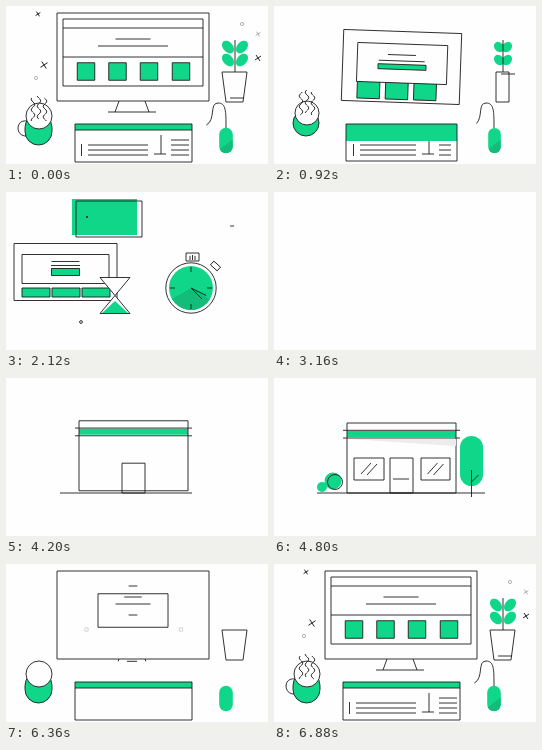
Animation of 262x158 px, one loop 6.92 s. Source, as an HTML page with a canvas:

```html
<!DOCTYPE html>
<html lang="en">
<head>
<meta charset="utf-8">
<style>
html, body { margin: 0; height: 100%; overflow: hidden; background: #fefefe; }
canvas { display: block; width: 100vw; height: 100vh; }
</style>
</head>
<body>
<canvas></canvas>
<script>
const LOOP = 6920, CUT = 3160;
const GREEN = '#10d68a', SHADE = '#13bd79', INK = '#1c1c1c', PAPER = '#fefefe', GREY = '#aaa';
const canvas = document.querySelector('canvas');
const c = canvas.getContext('2d');

const clamp = v => Math.max(0, Math.min(1, v));
const ease = v => v < .5 ? 4 * v ** 3 : 1 - (2 - 2 * v) ** 3 / 2;

// Keys are [time, ...values]; the values are held before the first and after the last.
function track(t, ...keys) {
  const next = keys.findIndex(k => k[0] > t);
  if (next === 0) return keys[0].slice(1);
  if (next < 0) return keys.at(-1).slice(1);
  const a = keys[next - 1], b = keys[next];
  const k = ease((t - a[0]) / (b[0] - a[0]));
  return a.slice(1).map((v, i) => v + (b[i + 1] - v) * k);
}
// Rises from 0 to 1 after `from` and falls back to 0 before `to`.
const show = (t, from, to, d = 160) => ease(clamp((t - from) / d)) * ease(clamp((to - t) / d));

function paint(fill, stroke = INK) {
  if (fill) { c.fillStyle = fill; c.fill(); }
  if (stroke) { c.strokeStyle = stroke; c.stroke(); }
}
function poly(points, fill, stroke, closed = true) {
  c.beginPath();
  points.forEach(p => c.lineTo(...p));
  if (closed) c.closePath();
  paint(fill, stroke);
}
const line = (x1, y1, x2, y2, color) => poly([[x1, y1], [x2, y2]], null, color, false);
function rect(x, y, w, h, fill, stroke) {
  c.beginPath();
  c.rect(x, y, w, h);
  paint(fill, stroke);
}
const centred = (x, y, w, h, fill, stroke) => rect(x - w / 2, y - h / 2, w, h, fill, stroke);
function pill(x, y, rx, ry, fill, stroke) {
  if (rx <= 0 || ry <= 0) return;
  c.beginPath();
  c.roundRect(x - rx, y - ry, 2 * rx, 2 * ry, Math.min(rx, ry));
  paint(fill, stroke);
}
const circle = (x, y, r, fill, stroke) => pill(x, y, r, r, fill, stroke);
function at(x, y, degrees, scale, draw) {
  if (scale <= 0) return;
  c.save();
  c.translate(x, y);
  c.rotate(degrees * Math.PI / 180);
  c.scale(scale, scale);
  draw();
  c.restore();
}

function particles(t) {
  const s = show(t, -440, 700);
  const cross = (x, y, r, color) => at(x, y, 12 + Math.max(0, t) * .05, s, () => {
    line(-r, -r, r, r, color);
    line(-r, r, r, -r, color);
  });
  cross(32, 8, 2);
  cross(38, 59, 3);
  cross(252, 28, 2, GREY);
  cross(252, 52, 2.5);
  [[30, 72], [236, 18]].forEach(([x, y]) => at(x, y, 0, s, () => circle(0, 0, 1.6, null, GREY)));
  if (t > 1350) {
    const [x] = track(t, [1350, 205], [1480, 211], [2400, 228]);
    line(x - 2, 34, x + 2, 34);
    at(144, 51, 0, show(t, 1350, 1650), () => circle(0, 0, .7, INK, null));
  }
}

function screen(t) {
  const [x, y, w, h, turn] = track(t,
    [-3120, 127.5, -40, 109, 70, 0], [-2640, 127.5, 80, 109, 70, 0], [-1160, 127.5, 80, 109, 70, 0],
    [-1000, 127.5, 25, 64, 75, 2], [-620, 127, 51, 152, 88, 0], [420, 127, 51, 152, 88, 0],
    [920, 127.5, 61, 118, 71, 2], [1480, 68.5, 80, 103, 57, -1], [2000, 59.5, 80, 103, 57, 0]);
  at(x, y, turn, 1, () => {
    centred(0, 0, w, h);
    const s = show(t, -680, 9999, 240);
    if (!s) return;
    const [ix, iy, iw, ih] = track(t, [420, 0, -4.5, 140, 67], [920, .5, -3.5, 90, 39], [1480, 0, -3, 87, 29]);
    const [gap, by, bw, bh, shift] = track(t,
      [420, 31.5, 14.5, 17.5, 17.5, -15.5], [920, 28.3, 24, 22.5, 17, -4], [1480, 30, 20.5, 28, 9, .5]);
    const [bx, buttonY, buttonW, buttonH] = track(t,
      [420, 48, 14.5, 17.5, 17.5], [920, .5, 0, 48, 5], [1480, 0, 0, 28, 7]);
    const pop = show(t, -560, 9999, 240);
    const tiles = () => {
      for (let i = -1; i < 2; i++) centred(shift + i * gap, by, bw * pop, bh * pop, GREEN);
    };
    const panel = fill => centred(ix, iy, iw * s, ih * s, fill);
    if (t < 560) { panel(); tiles(); } else { tiles(); panel(PAPER); }
    centred(bx, buttonY, buttonW * pop, buttonH * pop, GREEN);

    const rule = 70 * show(t, -600, 560);
    if (rule) { line(-rule, -29, rule, -29); line(-rule, 0, rule, 0); }
    const [y1, w1, y2, w2] = track(t,
      [420, -18, 17.5, -11, 35], [920, -12, 14, -6, 23], [1480, -10.5, 14, -6.5, 14.5]);
    line(-w1 * s, y1, w1 * s, y1);
    line(-w2 * s, y2, w2 * s, y2);
  });
  const stand = show(t, -620, 560);
  if (stand) {
    const foot = 95 + 11 * stand;
    line(113, 95, 113 - 4 * stand, foot);
    line(139, 95, 139 + 4 * stand, foot);
    line(126 - 24 * stand, foot, 126 + 24 * stand, foot);
  }
}

function keyboard(t) {
  const band = track(t,
    [-3120, 73, -67, 109, 6], [-2640, 73, 53, 109, 6], [-1160, 73, 53, 109, 6], [-1000, 72, 53.5, 111, 6],
    [-600, 69, 118, 117, 6], [700, 69, 118, 117, 6], [920, 72, 118, 111, 17], [1440, 66, 7, 65, 36]);
  rect(...band, GREEN, null);
  if (t < -960) {
    line(69, band[1] - .7, 186, band[1] - .7);
    line(69, band[1] + 7, 186, band[1] + 7);
    return;
  }
  const frame = track(t,
    [-960, 69, 53, 117, 7], [-600, 69, 118, 117, 38], [700, 69, 118, 117, 38],
    [920, 72, 118, 111, 37], [1480, 76, 10, 66, 36], [2100, 70, 9, 66, 36]);
  rect(...frame);
  if (t < 720) line(69, band[1] + band[3], 186, band[1] + band[3]);
  const s = show(t, -560, 1080);
  if (s) {
    const [left, right] = track(t, [700, 82, 183], [920, 86, 177]);
    line(left - 6.5, 138, left - 6.5, 138 + 12 * s);
    [139, 144, 149].forEach(y => {
      line(left, y, left + (142 - left) * s, y);
      line(165, y, 165 + (right - 165) * s, y);
    });
    if (t < 760) line(165, 134, 165 + 18 * s, 134);
    const top = track(t, [700, 129], [920, 135])[0];
    line(155, 148, 155, 148 - (148 - top) * s);
    line(148, 148, 148 + 12 * s, 148);
  }
  at(81, 25, 0, show(t, 1380, 2440), () => circle(0, 0, 1, INK, null));
}

function shopFront(t) {
  if (t > -460) return;
  const drop = show(t, -2640, -1160);
  if (drop) poly([[73, 61], [182, 61], [182, 61 + 7 * drop]], '#ececec', null);

  const [g1, g2] = track(t, [-3120, 120, 120], [-2720, 54, 186], [-2400, 54, 186], [-2140, 43, 211],
    [-960, 43, 211], [-740, 127, 127]);
  if (g1 < g2) line(g1, 115, g2, 115);

  const knob = 16 * show(t, -2500, -1080);
  if (knob) line(119, 101, 119 + knob, 101);

  const pane = (pose, glare) => {
    const [x, y, w, h, turn] = pose;
    at(x, y, turn, show(t, -2420, -480, 220), () => {
      centred(0, 0, w, h);
      if (glare) {
        line(-8, 5, 2, -6);
        line(-2, 6, 8, -5);
      }
    });
  };
  pane(track(t, [-1160, 95, 91, 30, 22, 0], [-1000, 71.5, 84, 35, 22, 39], [-560, 80.5, 65.5, 17, 17, 90]), t < -1100);
  pane(track(t, [-1160, 161.5, 91, 29, 22, 0], [-1000, 161.5, 87.5, 29, 21, 0], [-560, 175, 65.5, 17, 17, 0]), t < -900);
}

function plant(t) {
  const [x, y, top, bottom, h] = track(t,
    [-2880, 127.5, 115, 23, 23, 0], [-2640, 127.5, 97.5, 23, 23, 35], [-1160, 127.5, 97.5, 23, 23, 35],
    [-1000, 127.5, 93, 23, 23, 44], [-560, 228.5, 81, 25, 17, 30], [500, 228.5, 81, 25, 17, 30],
    [880, 228.5, 81, 13, 13, 30], [960, 228.5, 81, 13, 13, 30], [1440, 186.5, 65, 13, 13, 8]);
  if (t > -2880) {
    poly([[x - top / 2, y - h / 2], [x + top / 2, y - h / 2], [x + bottom / 2, y + h / 2], [x - bottom / 2, y + h / 2]]);
  }
  if (t > 1400) [-2.5, 0, 2.5].forEach(d => line(x + d, y - 2 + Math.abs(d) / 3, x + d, y + 3));

  const s = show(t, -520, 1160, 240);
  if (!s) return;
  const [spread, rx, ry] = track(t, [480, 7, 7.2, 5], [880, 4, 5.6, 4.6]);
  [41, 54].forEach(ly => [-1, 1].forEach(side => at(229 + side * spread, ly, side * -40 + (side < 0 ? 0 : 0), s, () => {
    c.beginPath();
    c.ellipse(0, 0, rx, ry, side < 0 ? .15 : -.15, 0, 7);
    paint(GREEN, null);
  })));
  line(229, 66, 229, 66 - 32 * s);
  const [lx, ly] = track(t, [500, 224, 92], [880, 227, 68]);
  line(lx, ly, lx + 14 * s, ly);
}

function mug(t) {
  const grow = show(t, -2400, 9999, 240);
  const bush = track(t, [-2140, 48, 109, 5], [-1160, 48, 109, 5], [-1000, 47, 109, 6], [-720, 34, 122, 0]);
  const body = track(t,
    [-1160, 59, 103, 8.5, 8.5], [-1000, 51, 116, 8, 8], [-560, 32.5, 123.5, 13.5, 15.5],
    [420, 32.5, 123.5, 13.5, 15.5], [820, 32, 117, 13, 13], [940, 32, 117, 13, 13], [1400, 75, 128, 0, 0]);
  const rim = track(t,
    [-1160, 61, 104, 7.5], [-1000, 38, 122, 8.5], [-560, 33, 110, 13], [420, 33, 110, 13],
    [820, 33, 107, 12], [940, 33, 107, 12], [1440, 75, 128, 1.4], [2160, 75, 130, 1.4], [2440, 75, 135, 0]);
  circle(bush[0], bush[1], bush[2] * grow, GREEN, null);

  const handle = show(t, -540, 640);
  at(19, 122, 0, handle, () => {
    c.beginPath();
    c.moveTo(2, -7);
    c.bezierCurveTo(-10, -9, -10, 9, 2, 8);
    paint();
  });
  pill(body[0], body[1], body[2] * grow, body[3] * grow, GREEN, t > -700 && t < 1300 ? INK : null);
  circle(rim[0], rim[1], rim[2] * grow, t > -1060 && t < 1400 ? PAPER : null);

  const steam = show(t, -480, 1100);
  if (steam) for (let i = -1; i < 2; i++) {
    c.beginPath();
    const low = t > 700 ? 109 : 115;
    for (let y = low; y > low - 24 * steam; y--) {
      c.lineTo(33 + i * 6 + 1.8 * Math.sin((y + t * .015) * .6 + i), y - (i ? 0 : 2));
    }
    paint();
  }
}

function mouse(t) {
  const grow = show(t, -2400, 9999, 240);
  const [x, y, rx, ry] = track(t,
    [-1160, 197.5, 83, 11.5, 25], [-1000, 197.5, 81, 12, 23.5], [-560, 220, 134.5, 6.8, 12.7],
    [700, 220, 134.5, 6.8, 12.7], [920, 220.5, 134.5, 6.3, 12.5], [1000, 220.5, 134.5, 6.3, 12.5],
    [1440, 185, 96, 22, 22]);
  const ring = show(t, 1240, 9999, 200);
  if (ring) circle(x, y, (rx + 3.2) * ring, PAPER);
  pill(x, y, rx * grow, ry * grow, GREEN, null);

  if (t > -560 && t < 1200) {
    c.save();
    c.beginPath();
    c.roundRect(x - rx, y - ry, rx * 2, ry * 2, Math.min(rx, ry));
    c.clip();
    poly([[x + rx, y - 1], [x + rx, y + ry], [x - rx, y + ry], [x - rx, y + 9]], SHADE, null);
    c.restore();
  }

  const trunk = show(t, -2320, -1040);
  if (trunk) {
    line(197.5, 119, 197.5, 119 - 27 * trunk);
    line(197.5, 104, 197.5 + 7 * trunk, 104 - 7 * trunk);
  }

  const cord = show(t, -520, 1120, 260);
  if (cord) {
    c.save();
    c.setLineDash([56 * cord, 200]);
    c.beginPath();
    c.moveTo(220, 122);
    c.bezierCurveTo(220, 105, 220, 97, 212, 97);
    c.bezierCurveTo(202, 97, 212, 118, 196, 120.5);
    paint();
    c.restore();
  }
  if (ring) stopwatch(x, y, ring, t);
}

function stopwatch(x, y, scale, t) {
  const turn = track(t, [1480, 0], [2500, 90])[0];
  at(x, y, 0, scale, () => {
    c.beginPath();
    c.moveTo(0, 0);
    c.arc(0, 0, 22, (-40 + turn) * Math.PI / 180, 150 * Math.PI / 180);
    c.closePath();
    paint(SHADE, null);
    for (let i = 0; i < 4; i++) at(0, 0, i * 90, 1, () => line(16, 0, 21, 0));
    at(0, 0, turn, 1, () => line(0, 0, 12, -12));
    line(0, 0, 11, 11);
    at(24.5, -22, 42, 1, () => centred(0, 0, 9, 5));
  });
}

function hourglass(t) {
  const y = track(t, [1480, 101], [2000, 103.5])[0];
  at(109, y, 0, show(t, 1160, 9999, 260), () => {
    poly([[-15, -18], [15, -18], [0, 0]], PAPER);
    poly([[0, 0], [15, 18], [-15, 18]], PAPER);
    const level = track(t, [1480, 9], [2500, 6])[0];
    poly([[0, level - 1], [13, 17.5], [-13, 17.5]], GREEN, null);
  });
}

function draw(now) {
  const time = now % LOOP;
  // Time relative to the finished desk: the shop comes before zero, the clock after.
  const t = time < CUT ? time : time - LOOP;
  const ratio = devicePixelRatio || 1;
  const w = Math.round(innerWidth * ratio), h = Math.round(innerHeight * ratio);
  if (canvas.width !== w || canvas.height !== h) { canvas.width = w; canvas.height = h; }
  c.setTransform(w / 262, 0, 0, h / 158, 0, 0);
  c.fillStyle = PAPER;
  c.fillRect(0, 0, 262, 158);
  c.lineWidth = .9;
  if (t >= -3120) [particles, keyboard, screen, shopFront, plant, mug, mouse, hourglass].forEach(part => part(t));
  requestAnimationFrame(frame);
}

let start;
function frame(now) {
  start ??= now;
  draw(now - start);
}
requestAnimationFrame(frame);
</script>
</body>
</html>
```
